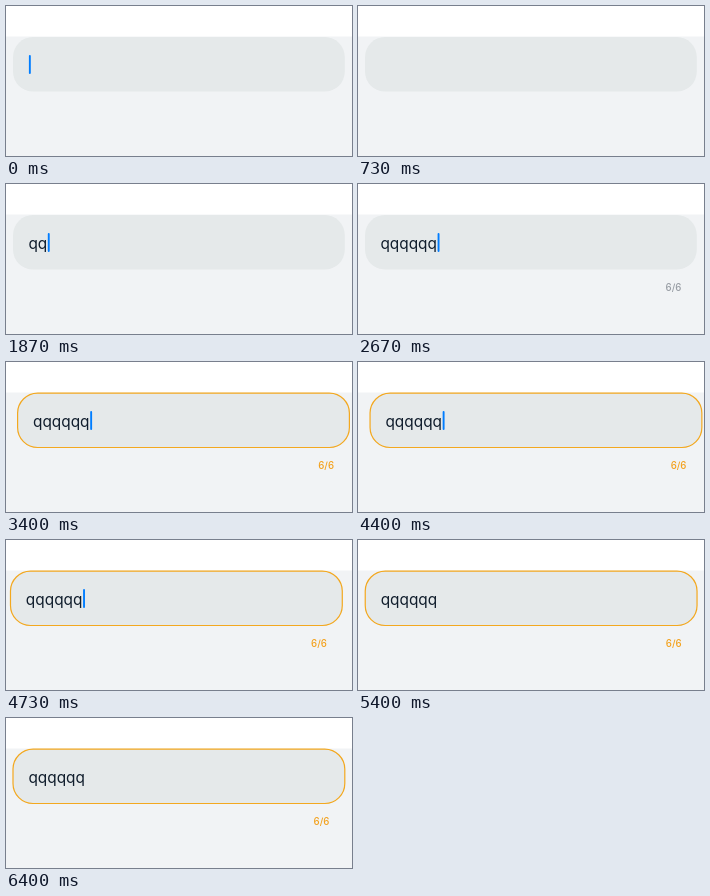
Recreate the animation shown at these times as an HTML page. Size 346 by 150 pixels, loop 6540 ms.

```html
<!DOCTYPE html>
<html lang="en">
<head>
<meta charset="utf-8">
<title>Text field with limit</title>
<style>
  html, body { margin: 0; width: 100%; height: 100%; overflow: hidden; background: #fff; }
  svg { display: block; width: 346px; height: 150px; }
  text { font-family: Inter, "Open Sans", sans-serif; }
  #typed { font-size: 15.4px; fill: #101d2c; }
  #count { font-size: 9.7px; font-weight: 500; fill: #979ca3; text-anchor: end; }
  #caret { fill: #007dff; }
  #box { fill: #e5e9ea; }
  .over #box { stroke: #f3a81f; stroke-width: 1.2; }
  .over #count { fill: #f3a11c; }
</style>
</head>
<body>
<svg viewBox="0 0 346 150">
  <rect y="30.5" width="346" height="120" fill="#f1f3f5"/>
  <g id="field">
    <rect id="box" x="7" y="31.1" width="331.8" height="54.4" rx="20"/>
    <text id="typed" x="22.4" y="64.5"></text>
    <rect id="caret" y="49" width="1.9" height="19" rx="0.9"/>
    <text id="count" x="323.4" y="107.2"></text>
  </g>
</svg>
<script>
const LOOP = 6540, STEP = 1000 / 15;
const LIMIT = 6, ADVANCE = 9.45;
const KEY_GAP = 200, KEYS_FROM = 1470, BLINK = 535;
const overAt = 3200;
const shakes = [3208, 4223];       // rejected keys that jolt the field
const wakes = [-335, 3200, 4405];  // moments the caret starts a fresh blink

const $ = id => document.getElementById(id);
const field = $('field'), typed = $('typed'), caret = $('caret'), count = $('count');
const last = (list, t) => Math.max(...list.filter(x => x <= t));

// Damped spring, restarted by each rejected key
function shift(t) {
  const now = Math.floor(t / STEP + 0.05) * STEP;
  const d = now - last(shakes, now);
  return d < 1750 ? -6.6 * Math.exp(-d * 0.0015) * Math.sin(2 * Math.PI * d / 237) : 0;
}

function draw(t) {
  const n = Math.max(0, Math.min(LIMIT, Math.floor((t - KEYS_FROM) / KEY_GAP)));
  const lastKey = n ? KEYS_FROM + n * KEY_GAP : -Infinity;
  const idle = t - Math.max(lastKey, last(wakes, t));
  typed.textContent = 'q'.repeat(n);
  count.textContent = n >= LIMIT / 2 ? `${n}/${LIMIT}` : '';
  caret.setAttribute('x', 22.9 + n * ADVANCE);
  caret.setAttribute('visibility', Math.floor(idle / BLINK) % 2 ? 'hidden' : 'visible');
  field.setAttribute('class', t >= overAt ? 'over' : '');
  field.setAttribute('transform', `translate(${shift(t).toFixed(2)} 0)`);
}

const start = performance.now();
function loop() {
  draw((performance.now() - start) % LOOP);
  requestAnimationFrame(loop);
}
loop();
</script>
</body>
</html>
```
